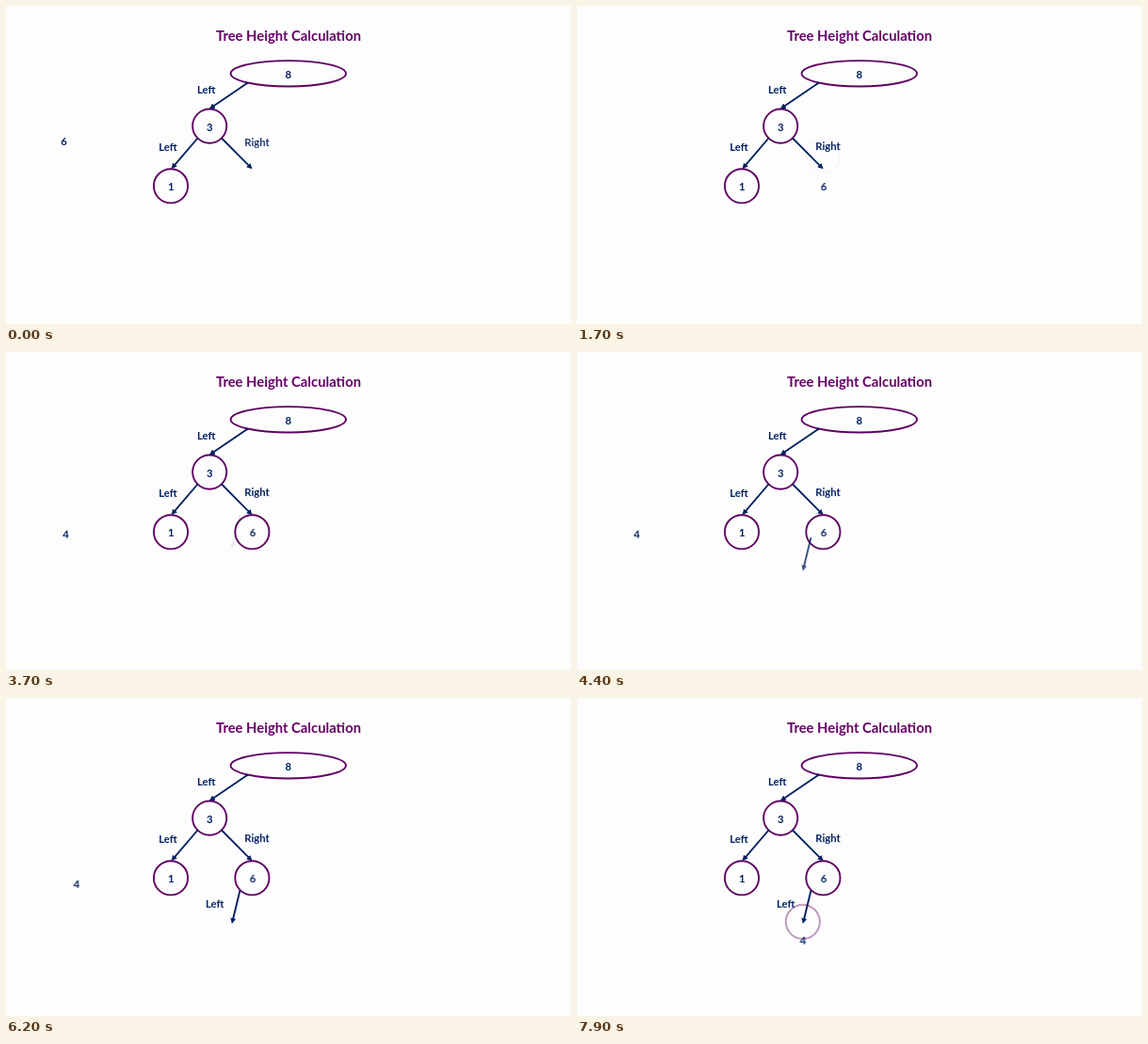
Write an HTML page that moves like this. It is 600x338 px and loops after 8000 ms.

```html
<!DOCTYPE html>
<html lang="en">
<head>
<meta charset="utf-8">
<title>Tree Height Calculation</title>
<style>
  html, body { margin: 0; width: 100%; height: 100%; overflow: hidden; background: #fdfdfe; }
  svg { display: block; width: 600px; height: 338px; }
  text { font: bold 11.3px Lato, "Open Sans", sans-serif; fill: #002060; text-anchor: middle; }
  .title { font-size: 14.8px; fill: #660066; }
  .node { fill: none; stroke: #5f0062; stroke-width: 1.9; }
  .edge { stroke: #002060; stroke-width: 1.9; }
  .anim { animation: 8s linear infinite; }

  /* Each item floats down 33.8px (a tenth of the stage) while fading in for one second. */
  #right { animation-name: right; }
  #six { animation-name: six; }
  #six-ring { animation-name: six-ring; }
  #four { animation-name: four; }
  #down { animation-name: down; }
  #left { animation-name: left; }
  #four-ring { animation-name: four-ring; }

  @keyframes right {
    0% { transform: translateY(-4.1px); opacity: .88; }
    1.5%, 100% { transform: none; opacity: 1; }
  }
  @keyframes six {
    0%, 1.5% { transform: translate(-200.5px, -48px); animation-timing-function: cubic-bezier(.7, 0, .55, 1); }
    21.1%, 100% { transform: none; }
  }
  @keyframes six-ring {
    0%, 20.9% { transform: translateY(-33.8px); opacity: 0; }
    33.4%, 100% { transform: none; opacity: 1; }
  }
  @keyframes four {
    0%, 33.3% { transform: translate(-176.5px, -97.8px); opacity: 0; }
    45.8% { transform: translate(-176.5px, -64px); opacity: 1; }
    73% { transform: translate(-176.5px, -64px); opacity: 1; animation-timing-function: cubic-bezier(.45, 0, .55, 1); }
    97.2%, 100% { transform: none; opacity: 1; }
  }
  @keyframes down {
    0%, 45.25% { transform: translateY(-33.8px); opacity: 0; }
    57.75%, 100% { transform: none; opacity: 1; }
  }
  @keyframes left {
    0%, 60.5% { transform: translateY(-33.8px); opacity: 0; }
    73%, 100% { transform: none; opacity: 1; }
  }
  @keyframes four-ring {
    0%, 93.65% { transform: translateY(-33.8px); opacity: 0; }
    100% { transform: translateY(-16.6px); opacity: .51; }
  }
</style>
</head>
<body>
<svg viewBox="0 0 600 338">
  <defs>
    <marker id="tip" viewBox="0 0 6 6" refX="3" refY="3" markerWidth="3.2" markerHeight="3.2" orient="auto">
      <path d="M0 0L6 3L0 6Z" fill="#002060"/>
    </marker>
  </defs>

  <text class="title" x="300" y="37">Tree Height Calculation</text>

  <ellipse class="node" cx="299.8" cy="71.8" rx="61.2" ry="13.7"/>
  <circle class="node" cx="216.2" cy="127.6" r="18.1"/>
  <circle class="node" cx="175" cy="191.3" r="18.1"/>
  <text x="299.8" y="76.5">8</text>
  <text x="216.2" y="132.5">3</text>
  <text x="175.2" y="195.5">1</text>

  <path class="edge" marker-end="url(#tip)" d="M257 81.5L218.3 107.8"/>
  <path class="edge" marker-end="url(#tip)" d="M203.5 140.5L177.5 170.8"/>
  <path class="edge" marker-end="url(#tip)" d="M229 140.5L259.4 171.2"/>
  <text x="212.8" y="92.7">Left</text>
  <text x="172" y="153.7">Left</text>
  <text id="right" class="anim" x="266.5" y="153">Right</text>

  <text id="six" class="anim" x="262" y="195.5">6</text>
  <circle id="six-ring" class="anim node" cx="261.4" cy="191.3" r="18.1"/>

  <path id="down" class="anim edge" marker-end="url(#tip)" d="M248.5 204.5L240.6 237"/>
  <text id="left" class="anim" x="221.7" y="223.2">Left</text>
  <text id="four" class="anim" x="240" y="262">4</text>
  <circle id="four-ring" class="anim node" cx="239.8" cy="257.8" r="18.1"/>
</svg>
</body>
</html>
```
